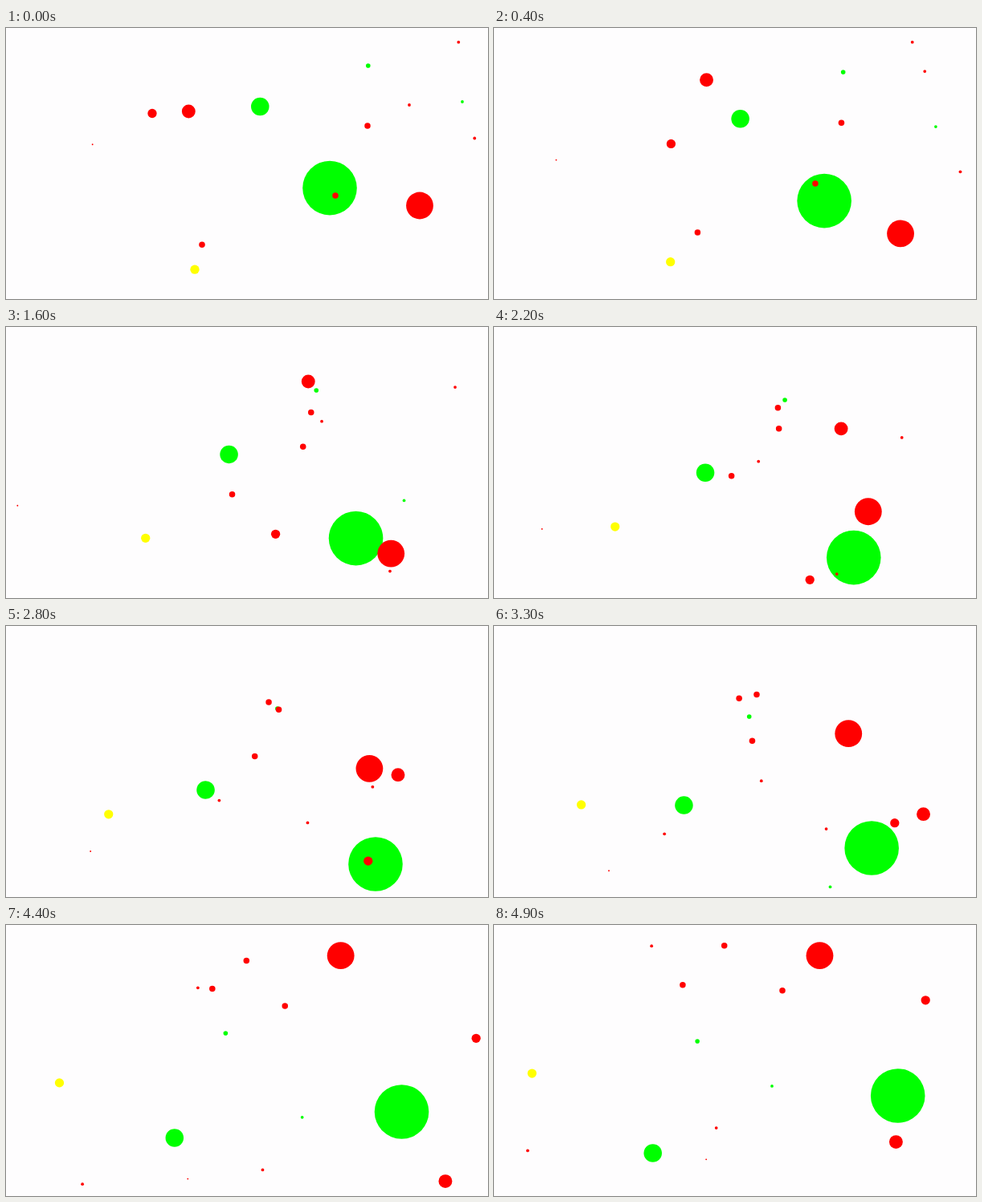
These frames come from a looping animation (600x338 px, 5000 ms). An HTML page:

```html
<!DOCTYPE html>
<html lang="en">
<head>
<meta charset="utf-8">
<title>Bouncing balls</title>
<style>
  html, body { margin: 0; width: 100%; height: 100%; overflow: hidden; background: #fefdfe; }
  svg { display: block; width: 600px; height: 338px; }
</style>
</head>
<body>
<svg id="stage" viewBox="0 0 600 338"></svg>
<script>
const W = 600, H = 338;
const LOOP = 5000, HOLD = 100;   // ms
const TICKS = 6;                 // physics ticks per picture
const UNIT = H / 10;             // radius of the largest ball

const GREEN = '#0f0', YELLOW = '#ff0', RED = '#f00';

// colour, size divisor, start x, start y, speed x, speed y (px per picture)
const balls = [
  [GREEN,   1, 403,   199.6,   2.035,   4],
  [GREEN,   3, 316.3,  98,    -2.42,    3.806],
  [GREEN,  12, 450.8,  47,    -4.033,   2],
  [GREEN,  18, 568,    92,    -4.53,    7.78],
  [YELLOW,  6, 235,   301.2,  -3.83,   -2.371],
  [RED,     2, 515,   221.5,  -2.235,   8.73],
  [RED,     4, 227.3, 104,     9.31,   -9.8],
  [RED,     6, 182,   106.5,   9.6,     9.49],
  [RED,     9, 410,   209,    -2.516,  -3.74],
  [RED,     9, 450,   122,    -4.39,   -0.965],
  [RED,     9, 244,   270.3,   2.347,  -3.847],
  [RED,    18, 502,    96,     8.556, -10.47],
  [RED,    18, 563.3,  17.7, -10.64,    8.33 * -1],
  [RED,    18, 583.3, 137.5,   8.54,   10.44],
  [RED,    36, 107.7, 145.2,  -7.57,    4.85]
];

// Position on one axis after n ticks, turning on the tick that passes a wall
function travel(pos, speed, r, size, n) {
  let v = speed / TICKS;
  for (let i = 0; i < n; i++) {
    pos += v;
    if (pos < r) v = Math.abs(v);
    else if (pos > size - r) v = -Math.abs(v);
  }
  return pos;
}

const stage = document.getElementById('stage');
const dots = balls.map(([fill, k]) => {
  const dot = document.createElementNS(stage.namespaceURI, 'circle');
  dot.setAttribute('r', UNIT / k);
  dot.setAttribute('fill', fill);
  return stage.appendChild(dot);
});

function draw(step) {
  const n = step * TICKS;
  balls.forEach(([, k, x, y, vx, vy], i) => {
    const r = UNIT / k;
    dots[i].setAttribute('cx', travel(x, vx, r, W, n));
    dots[i].setAttribute('cy', travel(y, vy, r, H, n));
  });
}

const start = performance.now();
let shown = -1;
function tick() {
  const step = Math.floor(((performance.now() - start) % LOOP) / HOLD);
  if (step !== shown) draw(shown = step);
  requestAnimationFrame(tick);
}
tick();
</script>
</body>
</html>
```
